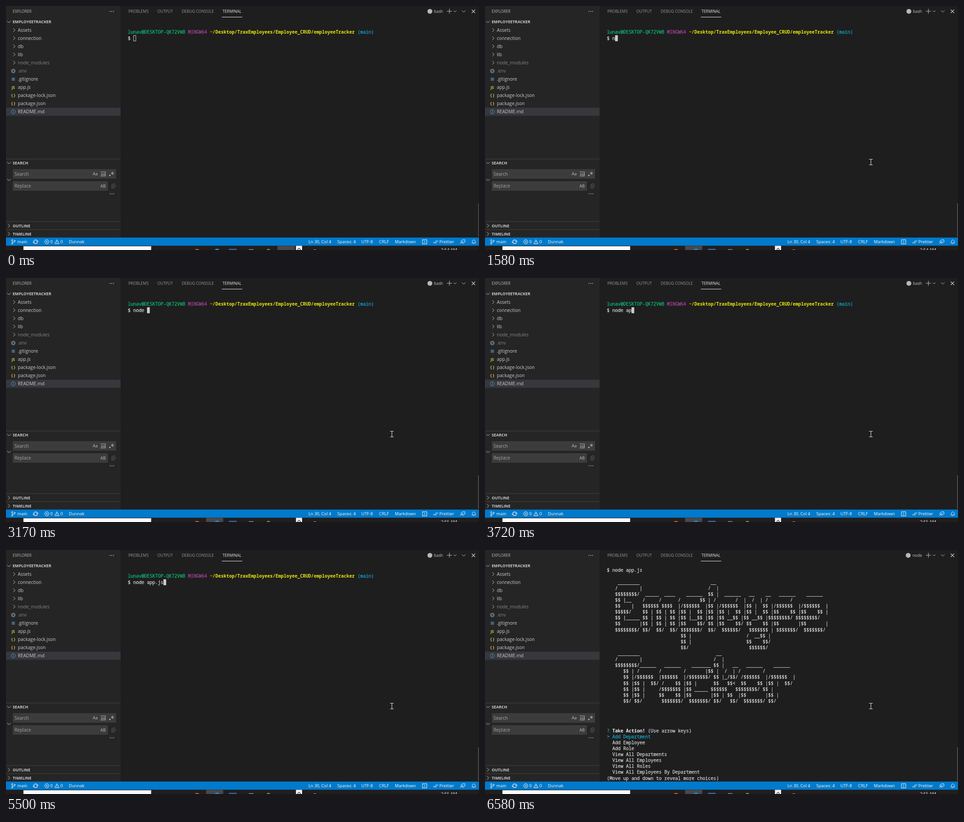
Write an HTML page that moves like this. It is 1040x539 px and loops after 8 s.

```html
<!DOCTYPE html>
<html lang="en">
<head>
<meta charset="utf-8">
<title>Terminal session</title>
<style>
  html, body { margin: 0; width: 100%; height: 100%; overflow: hidden; background: #1e1e1e; }
  svg { display: block; width: 100%; height: 100%; }
  text { white-space: pre; font-family: "Open Sans", "Noto Sans", sans-serif; }
  .term text { font: 500 10.02px "Noto Sans Mono", "DejaVu Sans Mono", monospace; stroke-width: 0.25px; }
  .term .bold { font-weight: 700; stroke-width: 0; }
</style>
</head>
<body>
<svg id="stage" viewBox="0 0 1040 539" preserveAspectRatio="none"></svg>
<script>
const LOOP = 8000;
const CELL = 6.012, ROW = 13.12, LEFT = 268, BASE = 48.32;
const TERM_TEXT = '#d4d4d4';
const stage = document.getElementById('stage');

function add(parent, tag, attrs, content) {
  const node = document.createElementNS('http://www.w3.org/2000/svg', tag);
  for (const key in attrs) node.setAttribute(key, attrs[key]);
  if (content !== undefined) node.textContent = content;
  return parent.appendChild(node);
}
const group = (parent = stage, attrs = {}) => add(parent, 'g', attrs);
const rect = (x, y, w, h, fill, parent = stage) =>
  add(parent, 'rect', { x, y, width: w, height: h, fill });
const label = (x, y, str, size, fill, extra = {}) =>
  add(stage, 'text', { x, y, 'font-size': size, fill, ...extra }, str);
const stroke = (d, color = '#c5c5c5', width = 1, parent = stage) =>
  add(parent, 'path', { d, fill: 'none', stroke: color, 'stroke-width': width });
const dot = (cx, cy, r, fill, parent = stage) => add(parent, 'circle', { cx, cy, r, fill });
const ring = (cx, cy, r, color, width = 1) =>
  add(stage, 'circle', { cx, cy, r, fill: 'none', stroke: color, 'stroke-width': width });
const right = (x, y, color) => stroke(`M${x - 2} ${y - 4}l4 4l-4 4`, color);
const down = (x, y, color, s = 4) => stroke(`M${x - s} ${y - s / 2}l${s} ${s}l${s} ${-s}`, color);
const dots = (x, y) => [-4, 0, 4].forEach(dx => dot(x + dx, y, 0.9, '#c5c5c5'));

function drawSidebar() {
  rect(0, 0, 252, 512, '#252526');
  label(14.7, 15.2, 'EXPLORER', 8.65, '#bbbbbb');
  dots(232.5, 12);
  heading(35, 'EMPLOYEETRACKER', true);

  rect(0, 224.5, 252, 18, '#37373d');
  const files = ['Assets', 'connection', 'db', 'lib', 'node_modules', '.env', '.gitignore',
    'app.js', 'package-lock.json', 'package.json', 'README.md'];
  files.forEach((name, i) => {
    const y = 53.4 + i * 18;
    const dim = name === 'node_modules' || name === '.env';
    label(26, y + 3.8, name, 10.15, dim ? '#858585' : '#cccccc');
    if (i < 5) right(18, y - 0.2);
    if (name.endsWith('.json')) label(16, y + 2.9, '{ }', 8.6, '#cbcb41', { 'font-weight': 700, 'text-anchor': 'middle' });
  });
  ring(16, 143.6, 3, '#6d8086', 2);
  add(stage, 'circle', { cx: 16, cy: 143.6, r: 4.4, fill: 'none', stroke: '#6d8086', 'stroke-width': 1.3, 'stroke-dasharray': '1.8 1.65' });
  rect(12.6, 158.2, 7, 7, '#3d657f');
  label(16, 183, 'JS', 8.2, '#cbcb41', { 'font-weight': 700, 'text-anchor': 'middle' });
  ring(16, 233.7, 4.6, '#519aba');
  stroke('M16 233v3.2M16 230.8v1.2', '#519aba', 1.2);

  for (const y of [337.5, 475.5, 493.5]) rect(0, y, 252, 1, '#444445');
  heading(346.7, 'SEARCH', true);
  heading(485.3, 'OUTLINE', false);
  heading(503.3, 'TIMELINE', false);
  drawSearch();
}

function heading(y, str, open) {
  (open ? down : right)(6.5, y, '#c5c5c5');
  label(14.7, y + 3.2, str, 8.8, '#cccccc', { 'font-weight': 700 });
}

function drawSearch() {
  rect(15, 360.5, 227, 21, '#3c3c3c');
  rect(15, 387, 209, 21, '#3c3c3c');
  down(6.5, 384, '#c5c5c5');
  label(18.7, 374.9, 'Search', 10, '#a6a6a6');
  label(18.7, 401.3, 'Replace', 10, '#a6a6a6');
  label(190.7, 374.2, 'Aa', 9.2, '#c5c5c5');
  label(208.6, 373.6, 'Ab', 7.6, '#c5c5c5');
  stroke('M208 366.5h11M208 375.6h11M218.4 366.5v9', '#c5c5c5', 0.9);
  rect(227, 373, 2.6, 2.6, '#c5c5c5');
  stroke('M234 366v7M231 367.8l6 3.5M237 367.8l-6 3.5', '#c5c5c5', 0.9);
  label(207.8, 400.7, 'AB', 8.9, '#c5c5c5');
  stroke('M232 395h6.5v7.5h-6.5zM234 395l1.5-2.8h3.5l1.8 2.5v4l-2 1.5M232 398.7h6.5M235.2 395v7.5', '#505050');
  dots(233, 414.7);
}

function drawPanelHeader() {
  const tabs = [[269, 'PROBLEMS'], [332.8, 'OUTPUT'], [386.3, 'DEBUG CONSOLE'], [476, 'TERMINAL']];
  tabs.forEach(([x, name], i) => label(x, 15.2, name, 8.65, i === 3 ? '#e7e7e7' : '#989898'));
  rect(474.5, 24, 45, 1, '#e7e7e7');
  stroke('M969.5 11.5h11M975 6v11');
  down(987.5, 11.6, '#c5c5c5', 3);
  down(1006.5, 11.8, '#c5c5c5');
  stroke('M1024 8l7.5 7.5M1031.5 8l-7.5 7.5', '#d0d0d0', 1.1);
}

function drawStatusBar() {
  const white = '#ffffff';
  rect(0, 511.5, 1040, 18.2, '#007acc');
  const items = [[25, 'main'], [97.6, '0'], [119.8, '0'], [138.3, 'Dunnak'], [665, 'Ln 30, Col 4'],
    [728.6, 'Spaces: 4'], [781.6, 'UTF-8'], [820.6, 'CRLF'], [855, 'Markdown'], [952.8, 'Prettier']];
  items.forEach(([x, str]) => label(x, 524.3, str, 9.35, white));
  for (const [x, y] of [[13.6, 517.3], [13.6, 524.7], [19, 518.9]]) ring(x, y, 1.5, white, 0.9);
  stroke('M13.6 519v4.2M19 520.5c0 2-5.4 1-5.4 2.5', white, 0.9);
  stroke('M60.8 520a4.3 4.3 0 0 1 8-1M69.2 521.6a4.3 4.3 0 0 1-8 1', white, 1.1);
  stroke('M67 520.4h4l-1.6-2.4zM59 521.2h4l-2.4 2.2z', white, 0.8);
  ring(89.8, 520.8, 4.5, white);
  stroke('M88 519l3.6 3.6M91.6 519l-3.6 3.6', white);
  stroke('M112 516.2l4.8 8.8h-9.6zM112 519.5v2.6M112 523v1', white, 0.9);
  stroke('M915.8 516.3h9.4v9.2h-9.4zM919 518.5l2.6 2.4l-2.6 2.4', white);
  stroke('M939.5 521.5l2.2 2.6l5-6.6M943.8 523l1.1 1.1l5-6.6', white);
  stroke('M1003 516.5h6v5h-2l-2 2v-2M1002 518.2a1.8 1.8 0 1 0 .1 0M999 525.5c.4-4 5.6-4 6 0', white, 0.9);
  stroke('M1024.5 523.5c1-1 .8-2 .8-3.6c0-4.2 6.4-4.2 6.4 0c0 1.6-.2 2.6.8 3.6zM1027.5 524.8c.4 1 1.6 1 2 0', white, 0.9);
}

function drawTaskbar() {
  rect(0, 529.7, 1040, 9.3, '#211e1d');
  rect(38, 530.3, 281.5, 9, '#8b8b8b');
  rect(38.7, 531, 280, 8, '#fafafa');
  const highlight = rect(597, 529.7, 37.5, 9.3, '#48484a');
  dot(420, 543, 6.5, '#b5652a');
  dot(464, 542.5, 6.5, '#2a8cc0');
  rect(490, 536.5, 17, 3, '#39679c');
  rect(534, 537, 10, 2, '#77716b');
  dot(577, 541, 4.5, '#a5775a');
  rect(637.5, 529.7, 13.5, 9.3, '#f0f0f0');
  stroke('M641 538.5l3.4-3.4l3.4 3.4', '#333333', 1.3);
  dot(679, 541, 3.6, '#c79a2c');
  const clock = label(956, 541.8, '', 9.5, '#f0f0f0');
  return { highlight, clock };
}

// Terminal text is laid out on a character grid.
function line(parent, row, col, str, fill = TERM_TEXT, bold = false) {
  return add(parent, 'text', {
    x: LEFT + col * CELL, y: BASE + row * ROW, fill, stroke: fill, class: bold ? 'bold' : ''
  }, str);
}

const banner = ` ________                          __
/        |                        /  |
$$$$$$$$/  _____  ____    ______  $$ |  ______   __    __   ______    ______
$$ |__    /     /      /       $$ | /       /  |  /  | /        /
$$    |   $$$$$$ $$$$  |/$$$$$$  |$$ |/$$$$$$  |$$ |  $$ |/$$$$$$  |/$$$$$$  |
$$$$$/    $$ | $$ | $$ |$$ |  $$ |$$ |$$ |  $$ |$$ |  $$ |$$    $$ |$$    $$ |
$$ |_____ $$ | $$ | $$ |$$ |__$$ |$$ |$$ __$$ |$$ __$$ |$$$$$$$$/ $$$$$$$$/
$$       |$$ | $$ | $$ |$$    $$/ $$ |$$    $$/ $$    $$ |$$       |$$       |
$$$$$$$$/ $$/  $$/  $$/ $$$$$$$/  $$/  $$$$$$/   $$$$$$$ | $$$$$$$/  $$$$$$$/
                        $$ |                    /  __$$ |
                        $$ |                    $$    $$/
                        $$/                      $$$$$$/
 ________                            __
/        |                          /  |
$$$$$$$$/______   ______    _______ $$ |   __   ______    ______
   $$ | /       /        /       |$$ |  /  | /        /
   $$ |/$$$$$$  |$$$$$$  |/$$$$$$$/ $$ |_/$$/ /$$$$$$  |/$$$$$$  |
   $$ |$$ |  $$/ /    $$ |$$ |      $$   $$<  $$    $$ |$$ |  $$/
   $$ |$$ |     /$$$$$$$ |$$ _____ $$$$$$   $$$$$$$$/ $$ |
   $$ |$$ |     $$    $$ |$$       |$$ | $$  |$$       |$$ |
   $$/ $$/       $$$$$$$/  $$$$$$$/ $$/   $$/  $$$$$$$/ $$/`;

function drawPrompt(term) {
  const g = group(term);
  line(g, 1, 0, 'lunav@DESKTOP-QK72VWB', '#0dbc79');
  line(g, 1, 22, 'MINGW64', '#a846a8');
  line(g, 1, 30, '~/Desktop/TraxEmployees/Employee_CRUD/employeeTracker', '#e5e510', true);
  line(g, 1, 84, '(main)', '#11a8cd');
  return g;
}

function drawMenu(term) {
  const g = group(term);
  banner.split('\n').forEach((str, i) => line(g, 2 + i, 3, str));
  line(g, 27, 0, '?', '#0dbc79');
  line(g, 27, 2, 'Take Action!', '#f0f0f0', true);
  line(g, 27, 15, '(Use arrow keys)');
  line(g, 28, 0, '> Add Department', '#11a8cd');
  ['Add Employee', 'Add Role', 'View All Departments', 'View All Employees',
    'View All Roles', 'View All Employees By Department']
    .forEach((str, i) => line(g, 29 + i, 2, str));
  line(g, 35, 0, '(Move up and down to reveal more choices)');
  return g;
}

drawSidebar();
drawPanelHeader();
const shellDot = dot(932, 11.8, 5.4, '#b8b8b8');
const shellName = label(961, 15, '', 8.8, '#cccccc', { 'text-anchor': 'end' });
const term = group(stage, { class: 'term' });
const prompt = drawPrompt(term);
const command = line(term, 2, 0, '');
const cursor = rect(0, 0, CELL, ROW, '#cccccc', term);
const menu = drawMenu(term);
const scrollbar = rect(1038, 436, 2, 74, '#4a4a4a');
drawStatusBar();
const taskbar = drawTaskbar();
const mouse = group();
const beam = 'M844.5 338.5h2.8l1.2 .8l1.2-.8h2.8M848.5 339v11.5M844.5 351h2.8l1.2-.8l1.2 .8h2.8';
stroke(beam, '#111111', 2.2, mouse);
stroke(beam, '#f2f2f2', 1.1, mouse);

// Key presses in ms; '<' is backspace.
const keys = [[1580, 'n'], [1670, 'o'], [1920, 'd'], [2070, 'e'], [2240, ' '], [3320, 'a'],
  [3720, 'p'], [3950, 'p'], [4470, '.'], [4790, 'j'], [4870, 's'], [5330, '<'], [5500, 's']];

const typedAt = t => keys.reduce((str, [at, key]) =>
  t < at ? str : key === '<' ? str.slice(0, -1) : str + key, '');
const show = (node, on) => node.setAttribute('display', on ? 'inline' : 'none');

function placeCursor(col, row, solid) {
  const inset = solid ? 0 : 0.5;
  const attrs = {
    x: LEFT + col * CELL + inset, y: BASE - 9.9 + row * ROW + inset,
    width: CELL - 2 * inset, height: ROW - 2 * inset,
    fill: solid ? '#cccccc' : 'none', stroke: solid ? 'none' : '#cccccc'
  };
  for (const key in attrs) cursor.setAttribute(key, attrs[key]);
}

function render(t) {
  const typed = typedAt(t);
  const entered = t >= 6120, running = t >= 6340, done = t >= 6580;

  command.textContent = '$ ' + typed;
  command.setAttribute('y', BASE + (done ? 0 : 2 * ROW));
  placeCursor(entered ? 0 : 2 + typed.length, entered ? 3 : 2, t >= 600);
  show(cursor, !done);
  show(prompt, !done);
  show(menu, done);

  shellName.textContent = running ? 'node' : 'bash';
  shellDot.setAttribute('cx', running ? 930.5 : 932);
  scrollbar.setAttribute('fill', t < 140 ? '#434343' : '#4a4a4a');
  show(mouse, t >= 140);
  taskbar.highlight.setAttribute('x', t < 540 ? 597 : 440);
  taskbar.clock.textContent = t < 3170 ? '2:54 AM' : '2:55 AM';
}

function tick() {
  render(performance.now() % LOOP);
  requestAnimationFrame(tick);
}
tick();
</script>
</body>
</html>
```
